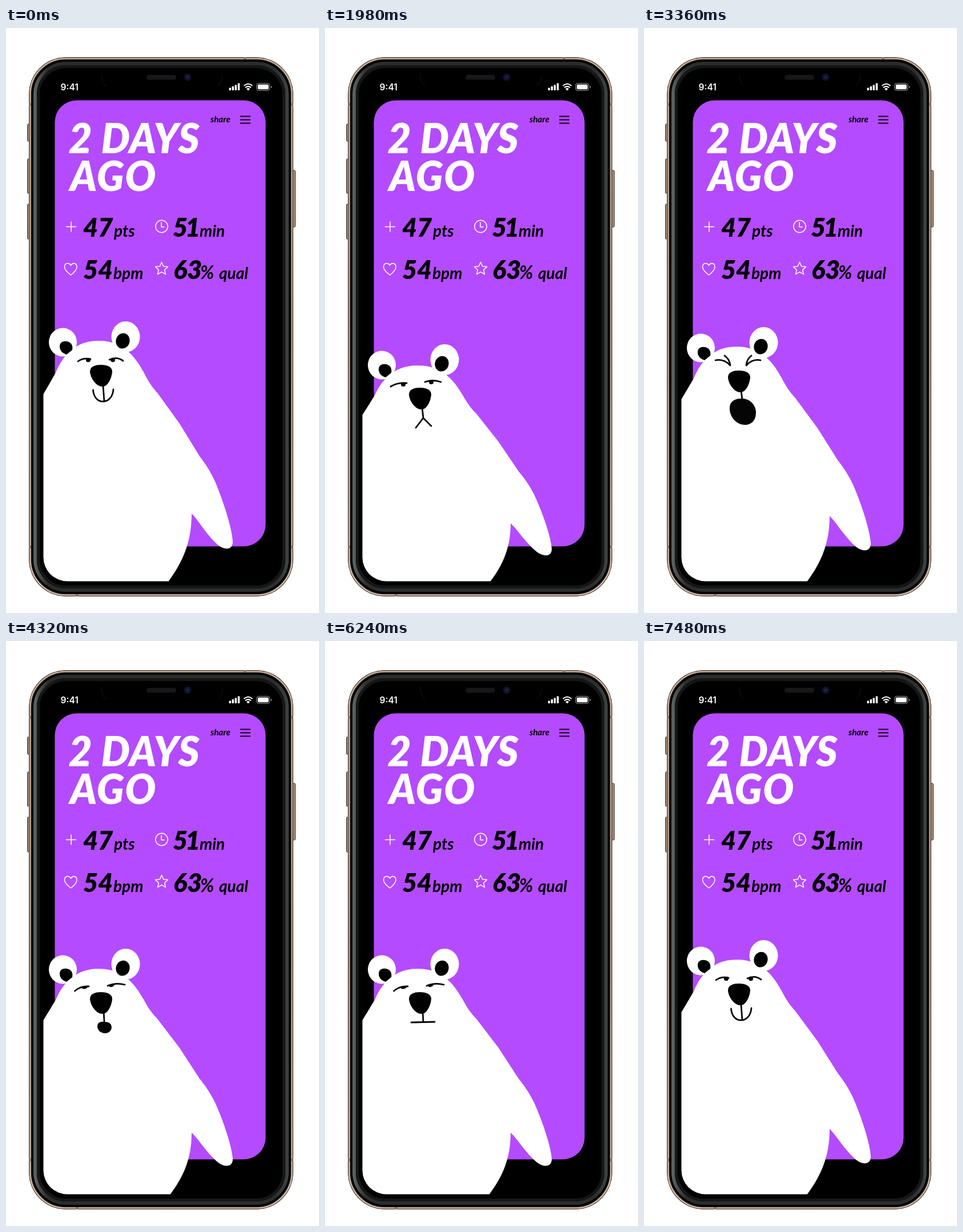
Recreate the animation shown at these times as an HTML page. Size 548x1023 px, loop 7.5 s.

```html
<!DOCTYPE html>
<html lang="en">
<head>
<meta charset="utf-8">
<title>Bear activity card</title>
<style>
  @property --drop { syntax: "<number>"; inherits: true; initial-value: 0; }

  html, body { margin: 0; width: 100%; height: 100%; overflow: hidden; background: #fff; }
  svg { display: block; width: 548px; height: 1023px; }

  .label { font-family: Lato, "Open Sans", sans-serif; font-style: italic; font-weight: 700; }
  .title { font-size: 71px; font-weight: 900; fill: #fff; }
  .value { font-size: 45px; font-weight: 900; }
  .unit { font-size: 28px; }
  .clock { font: 600 15.6px Inter, sans-serif; fill: #fff; }
  .icon { fill: none; stroke: #fff; stroke-width: 1.5; stroke-linejoin: round; stroke-linecap: round; }
  .ink { fill: none; stroke: #050505; stroke-width: 2.8; stroke-linecap: round; stroke-linejoin: round; }
  .ink .solid { fill: #050505; stroke: none; }

  .bear { animation: breathe 7.5s step-end infinite; }
  .head { transform: translateY(calc(var(--drop) * 1px)); }
  .skull { transform-origin: 0 604px; transform: scaleY(calc(1 - var(--drop) * var(--drop) / 28000)); }
  .body { transform-origin: 0 1040px; transform: scaleY(calc(1 - var(--drop) / 440)); }
  .face { visibility: hidden; animation: 7.5s step-end infinite; }
  .smile { animation-name: smile; }
  .flat { animation-name: flat; }
  .frown { animation-name: frown; }
  .gasp { animation-name: gasp; }
  .yawn { animation-name: yawn; }
  .calm { animation-name: calm; }

  @keyframes breathe {
    0%, 46% { --drop: 0; }
    4%, 40%, 50%, 88%, 100% { --drop: 10; }
    8%, 36%, 56%, 80% { --drop: 25; }
    12%, 59% { --drop: 40; }
  }
  @keyframes smile { 0%, 88%, 100% { visibility: visible; } 8% { visibility: hidden; } }
  @keyframes flat { 0%, 12%, 88%, 100% { visibility: hidden; } 8%, 80% { visibility: visible; } }
  @keyframes frown { 0%, 36%, 80%, 100% { visibility: hidden; } 12%, 59% { visibility: visible; } }
  @keyframes gasp { 0%, 40%, 59%, 100% { visibility: hidden; } 36%, 56% { visibility: visible; } }
  @keyframes yawn { 0%, 56%, 100% { visibility: hidden; } 40% { visibility: visible; } }
  @keyframes calm { 0%, 12%, 40%, 59%, 88%, 100% { visibility: hidden; } 8%, 36%, 56%, 80% { visibility: visible; } }
</style>
</head>
<body>
<svg viewBox="0 0 548 1023">
  <defs>
    <clipPath id="screen"><rect x="65.5" y="76" width="412" height="891.5" rx="42"/></clipPath>
    <linearGradient id="metal" x2="1" y2="0">
      <stop offset="0" stop-color="#59605e"/><stop offset=".05" stop-color="#2b2d2d"/>
      <stop offset=".95" stop-color="#2b2d2d"/><stop offset="1" stop-color="#3c4040"/>
    </linearGradient>
    <linearGradient id="gold" x2="0" y2="1">
      <stop offset="0" stop-color="#cdb3a0"/><stop offset=".5" stop-color="#b59c89"/><stop offset="1" stop-color="#d3bba8"/>
    </linearGradient>
  </defs>

  <!-- Phone -->
  <g fill="#a98f7c" stroke="#33281f" stroke-width="1">
    <rect x="37.5" y="168" width="5" height="30" rx="1.5"/>
    <rect x="37.5" y="229" width="5" height="60" rx="1.5"/>
    <rect x="37.5" y="308" width="5" height="61" rx="1.5"/>
    <rect x="501" y="249" width="5.5" height="99" rx="1.5"/>
  </g>
  <rect x="40.5" y="51.5" width="462" height="942" rx="64" fill="#120f0e" stroke="#4a3a30"/>
  <rect x="42.5" y="53.5" width="458" height="938" rx="62" fill="none" stroke="url(#gold)" stroke-width="2.6"/>
  <g fill="#8b7261">
    <path d="M416 51h5v4h-5zM122 990h5v4h-5zM40 131h4v5h-4zM499 131h4v5h-4zM40 905h4v5h-4zM499 905h4v5h-4z"/>
  </g>
  <rect x="45.5" y="56.5" width="452" height="932" rx="59" fill="#000"/>
  <rect x="51" y="62" width="441" height="921" rx="54" fill="none" stroke="url(#metal)" stroke-width="6"/>
  <rect x="56.5" y="67.500" width="430" height="910" rx="49" fill="#000" stroke="#151616" stroke-width="5"/>
  <path d="M167 80q0 18 9 22M379 83q0 13-9 18" fill="none" stroke="#151515"/>
  <rect x="246" y="82" width="52" height="8.5" rx="4.2" fill="#17171a"/>
  <circle cx="318" cy="86" r="6.5" fill="#10122a"/>
  <circle cx="318" cy="86" r="2.8" fill="#1c2148"/>

  <!-- Status bar -->
  <text class="clock" x="95.5" y="109">9:41</text>
  <g fill="#fff">
    <rect x="390.5" y="104.5" width="3.5" height="4.5" rx="1"/>
    <rect x="395.5" y="102" width="3.5" height="7" rx="1"/>
    <rect x="400.5" y="99.5" width="3.5" height="9.5" rx="1"/>
    <rect x="405.7" y="96.5" width="3.5" height="12.5" rx="1"/>
    <path d="M424 109.5l-3-3.3q3-2.5 6 0z"/>
    <rect x="440.8" y="98.8" width="19" height="8.4" rx="2"/>
    <path d="M464 101q2 2 0 4z"/>
  </g>
  <path d="M416.5 101q7.5-6.5 15 0M419 104.2q5-4.2 10 0" fill="none" stroke="#fff" stroke-width="2.1"/>
  <rect x="438.8" y="96.8" width="23" height="12.4" rx="3.5" fill="none" stroke="#aaa"/>

  <!-- Card -->
  <rect x="85.5" y="126.500" width="369" height="780" rx="38" fill="#b44bff"/>
  <g class="label">
    <text class="title" x="109.5" y="219" letter-spacing=".6">2 DAYS</text>
    <text class="title" x="112" y="285" letter-spacing="1.5">AGO</text>
    <text x="358" y="165" font-size="15.2">share</text>
    <g class="value">
      <text x="135" y="365">47</text><text x="292" y="365" letter-spacing="-4">51</text>
      <text x="135" y="439">54</text><text x="293" y="439">63</text>
    </g>
    <g class="unit">
      <text x="189" y="365">pts</text><text x="339" y="365">min</text>
      <text x="188" y="439">bpm</text><text x="340" y="439" font-size="32">%</text><text x="373" y="439">qual</text>
    </g>
  </g>
  <path d="M410 154.5h18M410 160.5h18M410 166.5h18" stroke="#16051f" stroke-width="2"/>
  <g class="icon">
    <path d="M105.5 347.5h17M114 339v17"/>
    <circle cx="272.5" cy="347" r="10.7"/>
    <path d="M272 340v8h5"/>
    <path d="M113.5 432C107 427 102.5 422.5 102.5 418C102.5 411 110 409.5 113.5 415C117 409.5 124 411 124 418C124 422.5 120 427 113.5 432Z"/>
    <path d="M272.5 409.5l3.2 7.3 7.7.8-5.7 5.4 1.7 7.7-6.9-4-6.9 4 1.7-7.7-5.7-5.4 7.7-.8z"/>
  </g>

  <!-- Bear -->
  <g class="bear" clip-path="url(#screen)">
    <path class="body" fill="#fff" d="M89 600C84 608 81 613 79 617L65 641V1010H250Q272 987 285 967C309 934 325 900 325 849C338 862 350 885 371 904C382 913 397 914 397 898C396 877 382 831 366 793C357 774 349 762 339 749L304 692L265 638C255 627 249 618 240 600Z"/>
    <g class="head">
      <g fill="#fff">
        <path class="skull" d="M86 606C95 580 118 546 162 547C207 546 229 579 242 604Z"/>
        <ellipse cx="99.5" cy="549.5" rx="24.5" ry="25"/>
        <ellipse cx="209.5" cy="540" rx="25" ry="27"/>
      </g>
      <path d="M94 557C94 548 103 546 110 549C116 552 117 557 116 563L106 571C99 569 94 564 94 557Z"/>
      <ellipse cx="204.5" cy="547" rx="12" ry="13.5" transform="rotate(15 204 547)"/>
      <path d="M147 601C147 592 156 589 166 589C178 589 186 593 186 601C185 613 178 627 169 627C158 627 148 613 147 601Z"/>

      <g class="ink face smile">
        <path d="M126 583Q135 576 148 579M181 580Q194 574 205 582M170 626L172 653M152.5 633C154 660 186 660 188 632"/>
        <ellipse class="solid" cx="144" cy="580.5" rx="4" ry="3.8"/>
        <ellipse class="solid" cx="187" cy="580.5" rx="4" ry="3.8"/>
      </g>
      <g class="ink face calm">
        <path d="M120.5 587Q131 578 145 579M178 578Q192 572 208 576M171 622L172 640"/>
        <path class="solid" d="M131 581L144 579Q140 585 134 583ZM179 577L191 575Q188 581 182 580Z"/>
      </g>
      <path class="ink face flat" d="M151 642L192 641"/>
      <g class="ink face gasp">
        <path class="solid" d="M160 649C160 638 174 641 179 642C188 645 187 660 174 661C166 661 160 656 160 649Z"/>
      </g>
      <g class="ink face frown">
        <path d="M115 587Q128 579 143 581M175 579Q188 574 203 579M170 623L172 642M159 659L172 642L186 656"/>
        <ellipse class="solid" cx="137" cy="583.5" rx="4" ry="3.5"/>
        <ellipse class="solid" cx="186" cy="579.5" rx="4" ry="3.5"/>
      </g>
      <g class="ink face yawn">
        <path d="M125 571Q140 568 151 580M141 563Q150 569 151 580M204 571Q190 568 179 580M188 563Q180 569 179 580M170 624L172 640"/>
        <path class="solid" d="M150 657C149 642 160 637 174 638C188 640 196 651 196 663C196 676 188 684 177 684C163 684 151 672 150 657Z"/>
      </g>
    </g>
  </g>
</svg>
</body>
</html>
```
